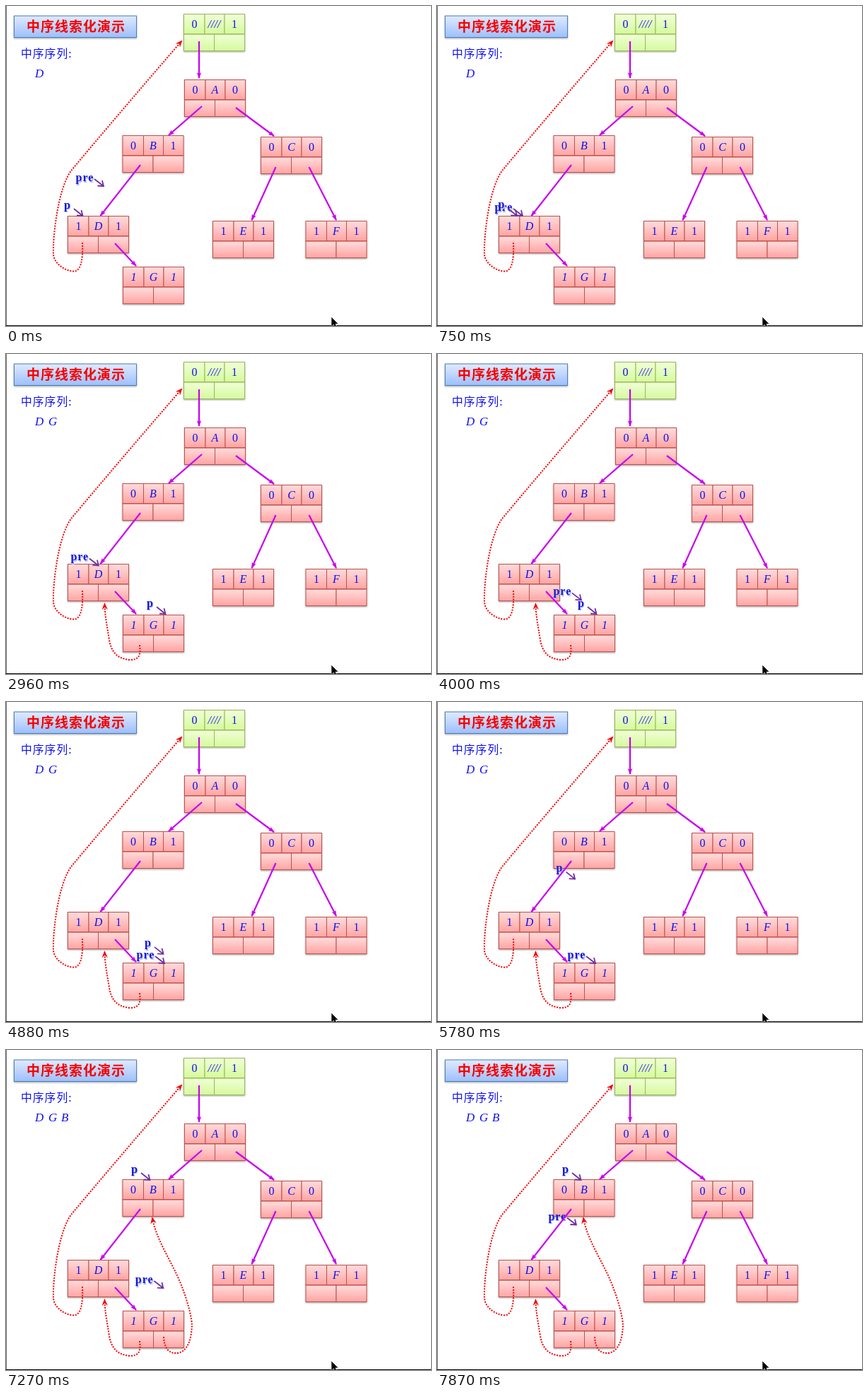
Animation of 601x453 px, one loop 8 s. Source, as an HTML page:

```html
<!DOCTYPE html>
<html lang="zh">
<head>
<meta charset="utf-8">
<title>中序线索化演示</title>
<style>
  html, body { margin: 0; width: 100%; height: 100%; overflow: hidden; background: #fff; }
  svg { display: block; width: 601px; height: 453px; }
  .cjk { font-family: "Noto Sans CJK SC", "Noto Sans CJK", sans-serif; letter-spacing: 1px; }
  .cell, .seq { font: 16px "Liberation Serif", serif; fill: #1010f0; }
  .cell { text-anchor: middle; }
  .seq { font-size: 17px; }
  .seq, .it { font-style: italic; }
  .links path { fill: none; stroke: #c800f0; stroke-width: 2.2; marker-end: url(#linkHead); }
  .thread { fill: none; stroke: #f40000; stroke-width: 2; stroke-dasharray: 2 1.8; marker-end: url(#threadHead); }
  .tag text { font: bold 16px "Liberation Serif", serif; letter-spacing: 1px; fill: #1818d8; }
  .tag text.shade { fill: #a9b4f4; }
  .tag path { fill: none; stroke: #7030a0; stroke-width: 1.8; }
</style>
</head>
<body>
<svg viewBox="0 0 601 453">
  <defs>
    <linearGradient id="red" x2="0" y2="1">
      <stop offset="0" stop-color="#ffdcdb"/><stop offset=".5" stop-color="#ffc0bf"/><stop offset="1" stop-color="#ffa4a2"/>
    </linearGradient>
    <linearGradient id="green" x2="0" y2="1">
      <stop offset="0" stop-color="#f0ffd8"/><stop offset="1" stop-color="#d6fa9c"/>
    </linearGradient>
    <linearGradient id="blue" x2="0" y2="1">
      <stop offset="0" stop-color="#e0ebff"/><stop offset="1" stop-color="#9cbffc"/>
    </linearGradient>
    <filter id="soft" x="-10%" y="-10%" width="120%" height="130%">
      <feDropShadow dx="0" dy="1.2" stdDeviation="1" flood-color="#000" flood-opacity=".35"/>
    </filter>
    <marker id="linkHead" markerUnits="userSpaceOnUse" markerWidth="10" markerHeight="8" refX="8" refY="4" orient="auto">
      <path d="M0 .8L9 4L0 7.2L2 4Z" fill="#c800f0"/>
    </marker>
    <marker id="threadHead" markerUnits="userSpaceOnUse" markerWidth="11" markerHeight="10" refX="8" refY="5" orient="auto">
      <path d="M0 .8L10 5L0 9.2L3.5 5Z" fill="#f40000"/>
    </marker>
  </defs>

  <rect x="11.5" y="14" width="173" height="30.500" fill="url(#blue)" stroke="#4a7ebb" filter="url(#soft)"/>
  <text class="cjk" x="29" y="36" font-size="19" font-weight="600" fill="#f80000">中序线索化演示</text>
  <text class="cjk" x="21" y="73" font-size="15.8" fill="#1010f0">中序序列:</text>
  <text class="seq" x="41" y="101">D</text>
  <text class="seq" id="seqG" x="60" y="101">G</text>
  <text class="seq" id="seqB" x="78" y="101">B</text>

  <g id="nodes"></g>

  <path class="thread" d="M108 335C109 355 107 374 97 375.5C85 376 69 366 67 352C66 325 74 256 93 232C108 214 165 146 248 50"/>
  <path class="thread" id="threadG" d="M189 412C191 428 187 433 175 433C155 431 149 420 146 405C143 385 140 372 139.500 354"/>
  <path class="thread" id="threadB" d="M223 406C224 425 232 430 243 429C258 426 262 408 263 390C262 370 250 335 240 315C228 290 212 265 207 238"/>

  <g class="tag" id="pre">
    <text class="shade" x="2.500" y="2.500">pre</text><text x="1.500" y="1">pre</text>
    <path d="M28 -2L41 8M32.500 7.500L41 8L39 0"/>
  </g>
  <g class="tag" id="p">
    <text class="shade" x="1" y="1">p</text><text x="0" y="-.5">p</text>
    <path d="M14 0L26.500 10M18 9.500L26.500 10L24.500 2"/>
  </g>

  <g class="links">
    <path d="M273 50V102"/>
    <path d="M277 142L230 183"/>
    <path d="M325 144L379 184"/>
    <path d="M190 225L133.500 297"/>
    <path d="M381.500 228L347.500 303"/>
    <path d="M428.500 228L467 303"/>
    <path d="M154 336L184 368"/>
  </g>

  <path d="M0.500 0V453" stroke="#666"/>
  <path d="M0 452.500H601" stroke="#000"/>
  <path d="M460 440V454L463.300 451L466 457L468.500 456L466 450H470Z" fill="#000" stroke="#fff" stroke-width=".6"/>
</svg>
<script>
const SVG = 'http://www.w3.org/2000/svg';
const byId = id => document.getElementById(id);

function add(parent, name, attrs, text = '') {
  const el = document.createElementNS(SVG, name);
  for (const key in attrs) el.setAttribute(key, attrs[key]);
  el.textContent = text;
  return parent.appendChild(el);
}

function drawNode(x, y, left, label, right, color = 'red') {
  const stroke = color === 'red' ? '#c0504d' : '#98b954';
  const group = add(byId('nodes'), 'g', { filter: 'url(#soft)' });
  const box = (dx, dy, width, height) => add(group, 'rect',
    { x: x + dx + .5, y: y + dy + .5, width, height, fill: `url(#${color})`, stroke });
  box(0, 0, 29.5, 28);
  box(29.5, 0, 28, 28);
  box(57.5, 0, 28.5, 28);
  box(0, 28.5, 43, 23.5);
  box(43, 28.5, 43, 23.5);
  [left, label, right].forEach((text, i) => add(byId('nodes'), 'text', {
    x: x + [15.5, 43.5, 72][i], y: y + 20,
    class: 'cell' + (label === 'G' || i === 1 ? ' it' : '')
  }, text));
}

drawNode(251, 11, 0, '////', 1, 'green');
drawNode(252, 104, 0, 'A', 0);
drawNode(164.5, 183, 0, 'B', 1);
drawNode(360, 185, 0, 'C', 0);
drawNode(87, 297, 1, 'D', 1);
drawNode(292, 304, 1, 'E', 1);
drawNode(423.5, 304, 1, 'F', 1);
drawNode(165, 369, 1, 'G', 1);

const smooth = u => u * u * (3 - 2 * u);
const settle = u => 1 - (1 - u) ** 2;

function move(start, end, d, ease = smooth) {
  const path = document.createElementNS(SVG, 'path');
  path.setAttribute('d', d);
  return { start, end, path, ease, length: path.getTotalLength() };
}

const moves = {
  pre: [
    move(0, 540, 'M97 247L80 289', settle),
    move(2620, 4620, 'M80 289C90 291 115 298 132 310C148 321 158 335 167 345C172 351 178 357 183 362'),
    move(6780, 8530, 'M183 362C188 358 189 355 188 352C187 344 185 337 182 331C172 300 157 266 156 241C155 215 159 194 164 176')
  ],
  p: [
    move(540, 2540, 'M82 287C100 286 108 287 119 287C145 287 160 294 173 306C186 318 197 340 199 358'),
    move(4590, 6590, 'M199 358C192 330 172 270 168 236C165 215 169 192 177 174')
  ]
};
const reveals = { seqG: 2500, threadG: 2500, seqB: 6600, threadB: 6600 };

const LOOP = 8000, TICK = 148.2;

function place(id, t) {
  const current = moves[id].filter(m => t >= m.start).pop() || moves[id][0];
  const u = Math.min(1, Math.max(0, (t - current.start) / (current.end - current.start)));
  const { x, y } = current.path.getPointAtLength(current.ease(u) * current.length);
  byId(id).setAttribute('transform', `translate(${x.toFixed(2)} ${y.toFixed(2)})`);
}

function render(elapsed) {
  // The motion advances in discrete ticks.
  const tick = Math.min(53, Math.floor((elapsed % LOOP + 12) / TICK));
  const t = tick * TICK;
  for (const id in moves) place(id, t);
  for (const id in reveals) byId(id).style.display = t >= reveals[id] ? '' : 'none';
}

const begin = performance.now();
function loop() {
  render(performance.now() - begin);
  requestAnimationFrame(loop);
}
loop();
</script>
</body>
</html>
```
